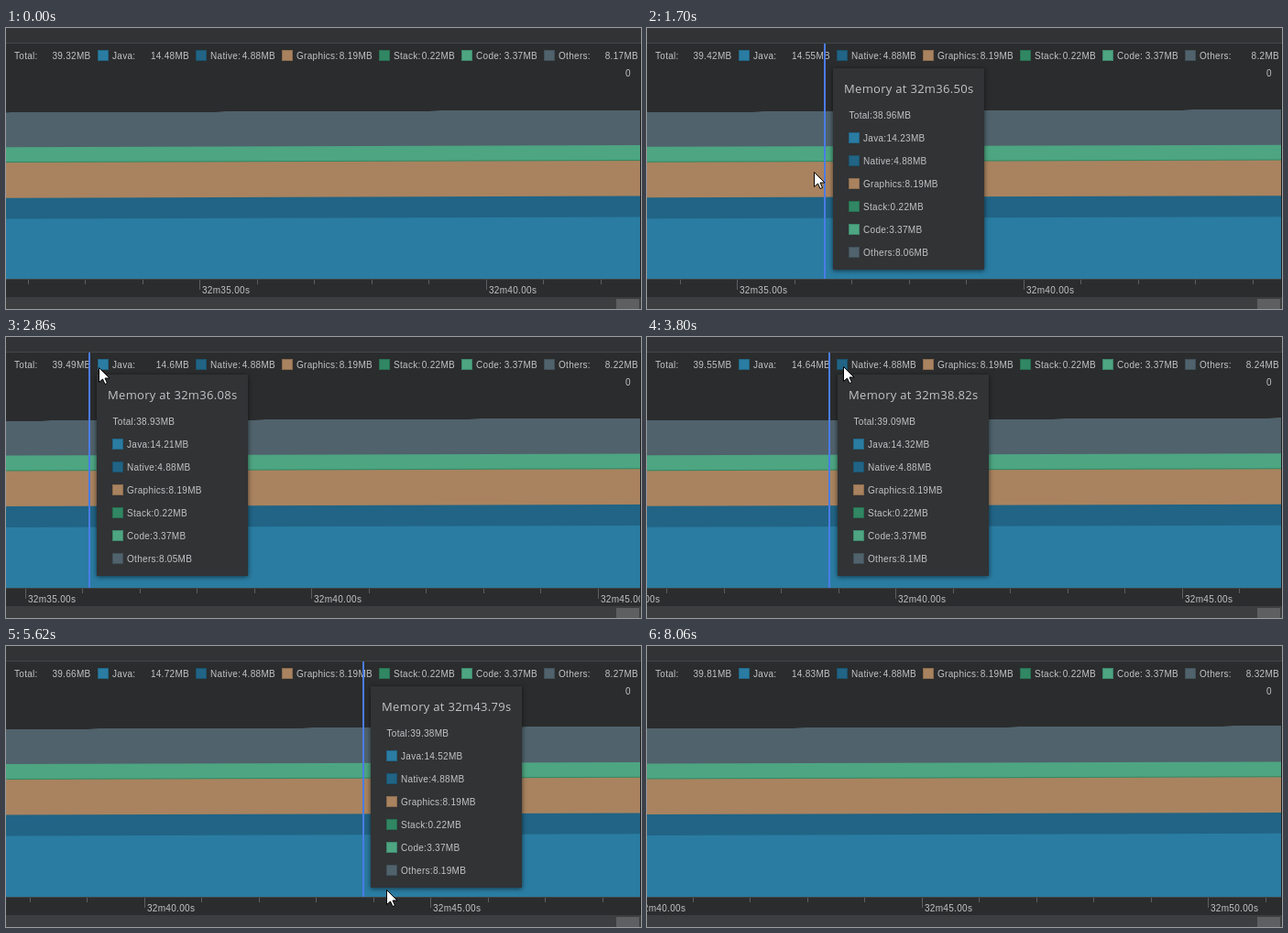
An HTML page with a canvas that plays this animation: 693x307 px, repeating every 8.16 s.

```html
<!DOCTYPE html>
<html>
<head>
<meta charset="utf-8">
<title>Memory profiler</title>
<style>
html, body { margin: 0; width: 100%; height: 100%; overflow: hidden; background: #2b2c2d; }
canvas { display: block; }
</style>
</head>
<body>
<canvas id="stage" width="693" height="307"></canvas>
<script>
const ctx = document.getElementById('stage').getContext('2d');
const LOOP = 8160, STEP_MS = 58.4, LAST_STEP = 138;
const W = 692, BASE = 274, PX_PER_SEC = 62.5, PX_PER_STEP = 3.885, PX_PER_MB = 4.71;
const START_SECOND = 42.69; // right edge of the chart at the start of the loop
const SMALL = '10px "Liberation Sans", Arial, sans-serif';
const TITLE = '13px "Open Sans", sans-serif';

// Bottom to top; x is the place in the legend
const PARTS = [
  { name: 'Java', color: '#2a7ca2', x: 100, mb: 14.48, growth: .0405 },
  { name: 'Native', color: '#216485', x: 207, mb: 4.88, growth: 0 },
  { name: 'Graphics', color: '#a9835f', x: 301, mb: 8.19, growth: 0 },
  { name: 'Stack', color: '#318763', x: 407, mb: .22, growth: 0 },
  { name: 'Code', color: '#4da582', x: 497, mb: 3.37, growth: 0 },
  { name: 'Others', color: '#50626c', x: 587, mb: 8.17, growth: .0175 }
];
const TOTAL = { mb: 39.316, growth: .058 };

// Step, x, y, horizontal speed per step
const POINTER = [
  [17, 700, 120, -100], [29, 182, 157, -.6], [45, 84, 30, 0], [49, 101, 33, 5.5],
  [65, 214, 32, 7.8], [83, 262, 114, 3.85], [99, 446, 282, 8], [115, 516, 288, 2]
];
const ENTER = 17, LEAVE = 117, LAG = 2;

function pointerAt(n) {
  let i = 1;
  while (i < POINTER.length - 1 && POINTER[i][0] < n) i++;
  const [n0, x0, y0, v0] = POINTER[i - 1], [n1, x1, y1, v1] = POINTER[i];
  const span = n1 - n0, u = Math.min(1, Math.max(0, (n - n0) / span));
  const ease = u * u * (3 - 2 * u);
  const bend = span * u * (1 - u) * (v0 * (1 - u) - v1 * u);
  return [x0 + (x1 - x0) * ease + bend, y0 + (y1 - y0) * ease];
}

const amount = (part, second) => part.mb + part.growth * (second - START_SECOND);
const size = (part, second) => +amount(part, second).toFixed(2) + 'MB';

function rect(x, y, w, h, color) {
  ctx.fillStyle = color;
  ctx.fillRect(x, y, w, h);
}

function text(str, x, y, font = SMALL, align = 'left') {
  ctx.font = font;
  ctx.letterSpacing = '0.3px';
  ctx.textAlign = align;
  ctx.fillStyle = '#c3c4c5';
  ctx.fillText(str, x, y);
}

const textRight = (str, x, y) => text(str, x, y, SMALL, 'right');

function swatch(color, x, y) {
  rect(x, y, 12, 12, color);
  ctx.strokeStyle = 'rgba(0,0,0,.18)';
  ctx.lineWidth = 1;
  ctx.strokeRect(x + .5, y + .5, 11, 11);
}

function path(points) {
  ctx.beginPath();
  for (const [x, y] of points) ctx.lineTo(x, y);
  ctx.closePath();
}

function area(points, color) {
  path([[points[0][0], BASE], ...points, [points.at(-1)[0], BASE]]);
  ctx.fillStyle = color;
  ctx.fill();
}

function drawChart(scroll, right) {
  ctx.save();
  ctx.beginPath();
  ctx.rect(0, 17, W, BASE - 17);
  ctx.clip();
  // The topmost edge climbs one pixel at a time
  const top = [];
  for (let i = 0; i < 7; i++) {
    const x = 234 * i - scroll;
    top.push([x - 6, 93 - i], [x + 6, 92 - i]);
  }
  area(top, PARTS[5].color);
  const edge = (count, second) =>
    BASE + .7 - PX_PER_MB * PARTS.slice(0, count).reduce((sum, p) => sum + amount(p, second), 0);
  for (let count = 5; count > 0; count--) {
    area([[0, edge(count, right - W / PX_PER_SEC)], [W, edge(count, right)]], PARTS[count - 1].color);
  }
  ctx.restore();
}

function drawAxis(tick40) {
  rect(0, BASE, W, 1, '#414547');
  for (let s = 30; s <= 55; s++) {
    const x = Math.round(tick40 + (s - 40) * PX_PER_SEC);
    const major = s % 5 === 0;
    rect(x, BASE + 1, 1, major ? 11 : 5, '#5c5f61');
    if (major) text(`32m${s}.00s`, x + 3, 290);
  }
}

function drawLegend(second) {
  text('Total:', 9, 34);
  textRight(size(TOTAL, second), 92.5, 34);
  PARTS.forEach((part, i) => {
    const next = i < 5 ? PARTS[i + 1].x : 697;
    swatch(part.color, part.x, 24);
    text(part.name + ':', part.x + 16, 34);
    textRight(size(part, second), next - 7, 34);
  });
  text('0', 676, 53);
}

function drawTooltip(lineX, y, tick40) {
  rect(Math.round(lineX), 17, 2, BASE - 17, '#4a7ce6');
  const left = Math.round(lineX + 9.6), top = Math.round(Math.min(y + 9, 44));
  ctx.save();
  ctx.shadowColor = 'rgba(0,0,0,.6)';
  ctx.shadowBlur = 5;
  ctx.shadowOffsetY = 1;
  rect(left, top, 165, 220, '#313335');
  ctx.restore();

  const second = 40 + (lineX - tick40) / PX_PER_SEC - .02;
  text(`Memory at 32m${second.toFixed(2)}s`, left + 12, top + 27, TITLE);
  text('Total:' + size(TOTAL, second), left + 17.5, top + 55);
  PARTS.forEach((part, i) => {
    const rowY = top + 70 + i * 25;
    swatch(part.color, left + 17, rowY);
    text(`${part.name}:${size(part, second)}`, left + 33, rowY + 10);
  });
}

function drawPointer(x, y) {
  ctx.save();
  ctx.translate(Math.round(x) + .5, Math.round(y) + .5);
  path([[0, 0], [0, 16], [4, 12.5], [6.5, 18], [9, 17], [6.5, 11.5], [11.5, 11.5]]);
  ctx.fillStyle = '#fff';
  ctx.fill();
  ctx.strokeStyle = '#000';
  ctx.lineWidth = 1;
  ctx.stroke();
  ctx.restore();
}

function draw(t) {
  const n = Math.min(LAST_STEP, Math.floor(t / STEP_MS + .05));
  const scroll = n * PX_PER_STEP;
  const second = START_SECOND + scroll / PX_PER_SEC;
  const tick40 = 523.6 - scroll;

  rect(0, 0, 693, 307, '#2b2c2d');
  rect(0, 0, 693, 16, '#313335');
  rect(0, 16, 693, 1, '#434648');
  drawChart(scroll, second);
  drawAxis(tick40);
  rect(W, 17, 1, 277, '#202122');
  rect(0, 294, 693, 13, '#3c3e40');
  rect(666, 296, 25, 11, '#5d5f61');
  drawLegend(second);

  const [lineX, lineY] = pointerAt(n - LAG);
  if (n - LAG > ENTER && lineY < BASE) drawTooltip(lineX, lineY, tick40);
  if (n >= ENTER && n < LEAVE) drawPointer(...pointerAt(n));
}

const start = performance.now();
function tick() {
  draw((performance.now() - start) % LOOP);
  requestAnimationFrame(tick);
}
tick();
</script>
</body>
</html>
```
